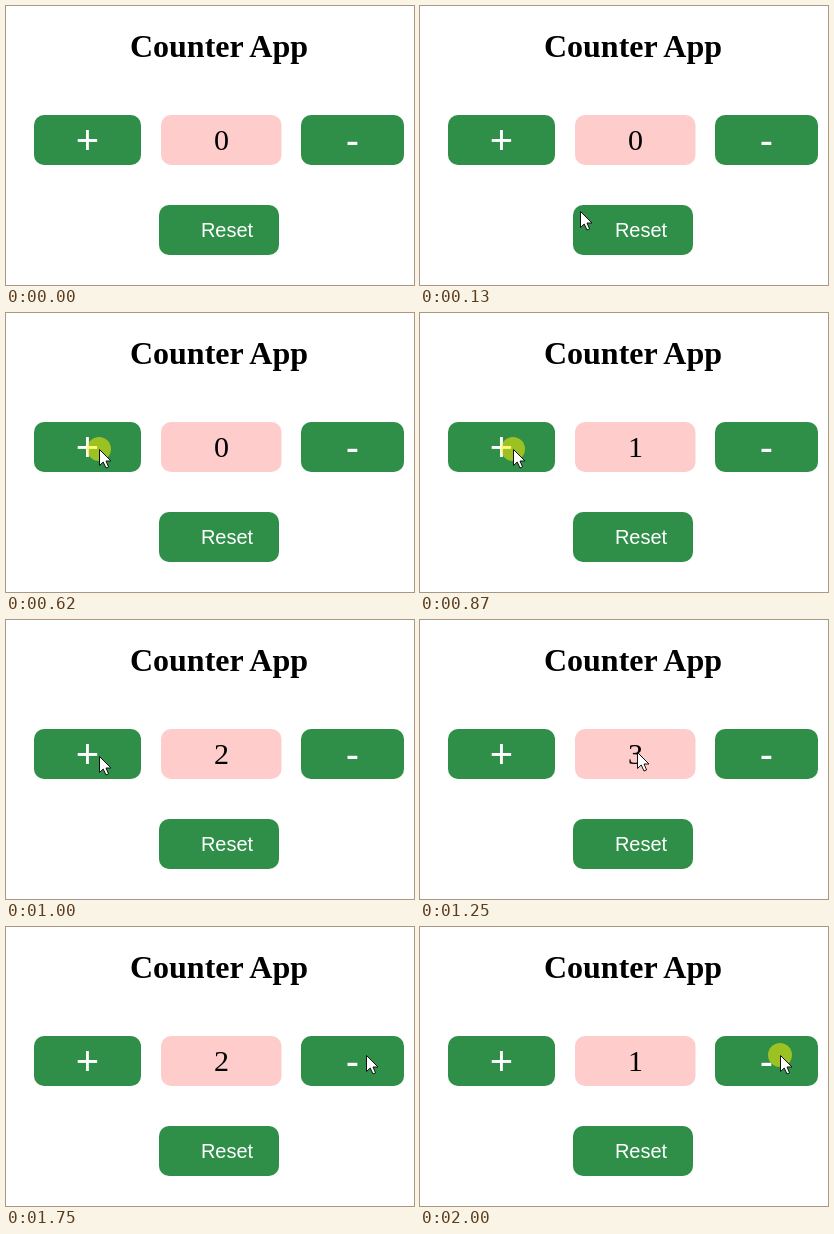
Recreate the animation shown at these times as an HTML page. Size 408 px wide and 279 px high, loop 2130 ms.

```html
<!DOCTYPE html>
<html lang="en">
<head>
<meta charset="utf-8">
<title>Counter App</title>
<style>
  html, body { margin: 0; width: 100%; height: 100%; overflow: hidden; background: #fff; }
  svg { display: block; width: 408px; height: 279px; }
  text { text-anchor: middle; }
  .serif { font-family: "Liberation Serif", "Times New Roman", serif; }
  .label { font-family: "Liberation Sans", Arial, sans-serif; fill: #fff; }
  .button { fill: #2f8f49; }
</style>
</head>
<body>
<svg viewBox="0 0 408 279">
  <text class="serif" x="213" y="51" font-size="32" font-weight="bold">Counter App</text>

  <rect class="button" x="28" y="109" width="107" height="50" rx="10"/>
  <text class="label" x="81.5" y="148" font-size="40">+</text>

  <rect x="155" y="109" width="120.5" height="50" rx="10" fill="#fcc"/>
  <text class="serif" id="count" x="215.5" y="144" font-size="30">0</text>

  <rect class="button" x="295" y="109" width="103" height="50" rx="10"/>
  <text class="label" x="346.5" y="148" font-size="40">-</text>

  <rect class="button" x="153" y="199" width="120" height="50" rx="10"/>
  <text class="label" x="221" y="231" font-size="20">Reset</text>

  <g id="pointer">
    <circle id="press" r="12" fill="#fff000" fill-opacity=".52"/>
    <path d="M.5.5V16.5L4.2 13 7 19 9.6 17.9 7 12H12Z" fill="#fff" stroke="#111" stroke-linejoin="round"/>
  </g>
</svg>
<script>
  const LOOP = 2130;
  const [count, pointer, press] = ["count", "pointer", "press"].map(id => document.getElementById(id));

  const plus = [93, 136], display = [217, 132], minus = [360, 128];

  // [start ms, count, pointer position, pressed]
  const steps = [
    [0, 0, null],
    [130, 0, [160, 205]],
    [240, 0, [133, 162]],
    [370, 0, [122, 152]],
    [480, 0, plus],
    [620, 0, plus, true],
    [730, 1, plus],
    [870, 1, plus, true],
    [1000, 2, plus],
    [1120, 3, plus, true],
    [1250, 3, display],
    [1370, 3, [335, 129]],
    [1500, 3, minus],
    [1620, 3, minus, true],
    [1750, 2, minus],
    [1880, 2, minus, true],
    [2000, 1, minus, true]
  ];

  const show = (node, on) => node.setAttribute("display", on ? "inline" : "none");

  function draw() {
    const time = performance.now() % LOOP;
    const [, value, position, pressed] = steps.filter(([start]) => start <= time).pop();
    count.textContent = value;
    show(pointer, position);
    show(press, pressed);
    if (position) pointer.setAttribute("transform", `translate(${position})`);
    requestAnimationFrame(draw);
  }
  draw();
</script>
</body>
</html>
```
